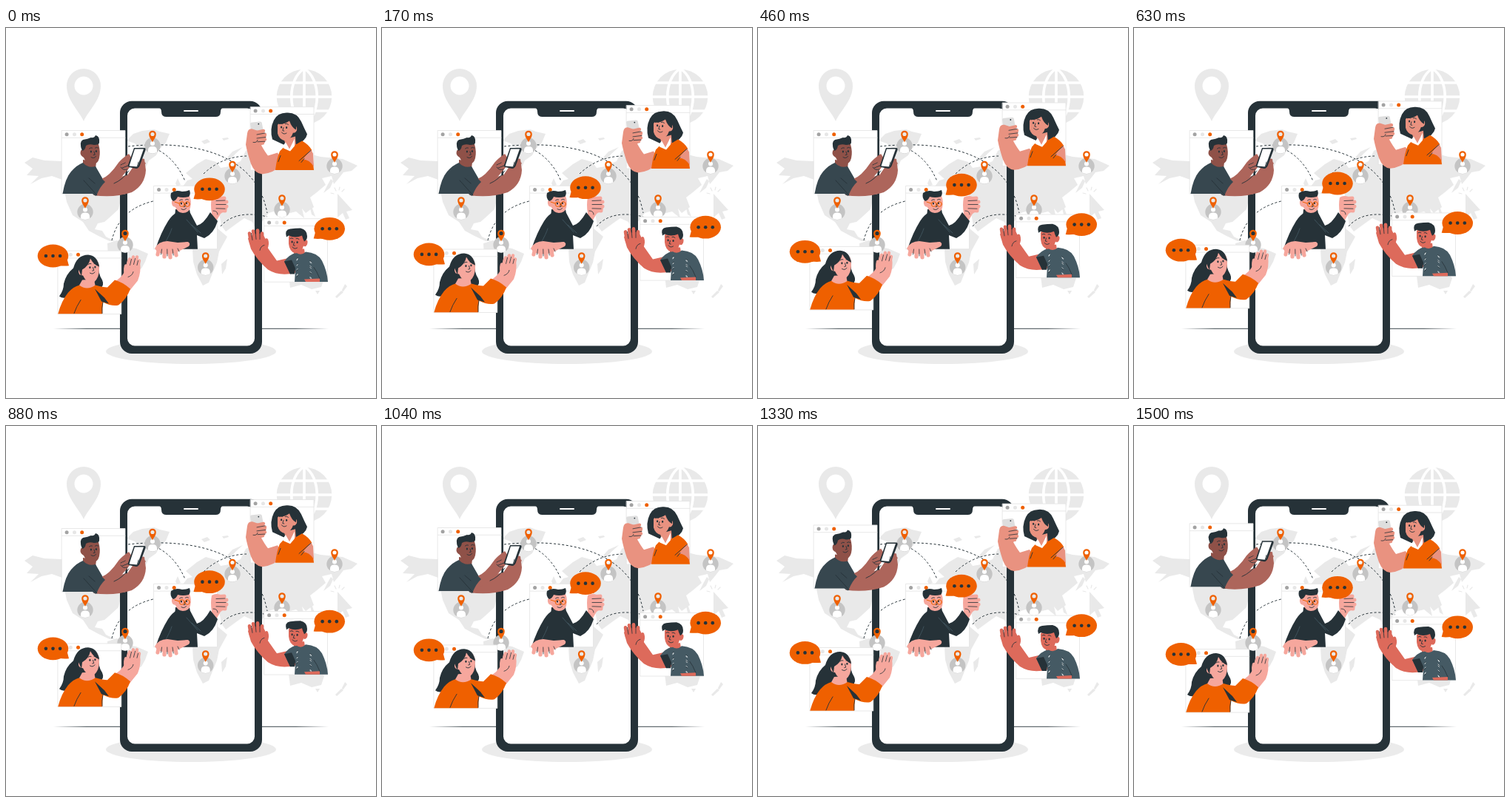
An HTML page with a canvas that plays this animation: 500x500 px, repeating every 1540 ms.

```html
<!DOCTYPE html>
<html lang="en">
<head>
<meta charset="utf-8">
<title>Connected people</title>
<style>
html, body { margin: 0; width: 100%; height: 100%; overflow: hidden; background: #fff; }
canvas { display: block; width: 100vw; height: 100vh; }
</style>
</head>
<body>
<canvas id="stage"></canvas>
<script>
const LOOP = 1540, HALF = LOOP / 2, LEAD = 40, RISE = 9.5;
const DARK = '#263238', SLATE = '#37474f', STEEL = '#455a64', ORANGE = '#ef6000';
const PALE = '#e9e9e9', GREY = '#c4c4c4', PINK = '#f6a79d';

const canvas = document.getElementById('stage');
const ctx = canvas.getContext('2d');
const density = Math.max(1, window.devicePixelRatio || 1);
canvas.width = canvas.height = 500 * density;

const paths = new Map();
function path(d) {
  if (!paths.has(d)) paths.set(d, new Path2D(d));
  return paths.get(d);
}
function shape(color, d) {
  ctx.fillStyle = color;
  ctx.fill(path(d), 'evenodd');
}
function line(d, width = 0.8, color = DARK, dash = []) {
  ctx.lineWidth = width;
  ctx.strokeStyle = color;
  ctx.lineCap = dash.length ? 'butt' : 'round';
  ctx.lineJoin = 'round';
  ctx.setLineDash(dash);
  ctx.stroke(path(d));
}
function oval(color, x, y, rx, ry = rx, turn = 0) {
  ctx.fillStyle = color;
  ctx.beginPath();
  ctx.ellipse(x, y, rx, ry, turn, 0, Math.PI * 2);
  ctx.fill();
}
function box(color, x, y, w, h, r) {
  ctx.fillStyle = color;
  ctx.beginPath();
  ctx.roundRect(x, y, w, h, r);
  ctx.fill();
}
function at(x, y, draw) {
  ctx.save();
  ctx.translate(x, y);
  draw();
  ctx.restore();
}

function panel(x, y) {
  box('#fff', x, y, 85.5, 85.5, 0);
  line(`M${x} ${y}h85.5v85.5h-85.5zM${x} ${y + 9.8}h85.5`, 0.8, '#e2e2e2');
  [['#a3a3a3', 6.6], ['#e6e6e6', 17], [ORANGE, 27.2]]
    .forEach(([color, dx]) => oval(color, x + dx, y + 5.2, 2.5));
}
function bubble(x, y, side) {
  oval(ORANGE, x, y, 20.8, 15.4);
  at(x, y, () => shape(ORANGE, `M${side * 19} 4L${side * 21.5} 13.3Q${side * 15} 14 ${side * 8} 13Z`));
  [-9.6, 0, 9.6].forEach(dx => oval(DARK, x + dx, y, 2.3));
}
function features(x, y, turn = 1) {
  at(x, y, () => {
    ctx.scale(turn, 1);
    oval(DARK, -3.6, 0, 1.1, 1.5);
    oval(DARK, 3.4, -0.6, 1.1, 1.5);
    line('M-6 -4q2 -2 4 -1M2 -5q2 -1.5 4 0M0.5 0l1.2 4.2-2 .4M-3.5 7.6q4 2.6 6.5 -1.2', 0.9);
  });
}

function marker(x, y) {
  at(x, y, () => {
    oval(GREY, 0, 13.5, 10.7);
    oval('#fff', 0, 10.5, 3);
    shape('#fff', 'M-6 22.3V19Q-5.5 14.6 0 14.6Q5.5 14.6 6 19V22.3Q0 25.5-6 22.3Z');
    shape(ORANGE, 'M0 9C-1.5 5-4.8 2.5-4.8-2A4.8 4.8 0 0 1 4.8-2C4.8 2.5 1.5 5 0 9ZM-2.6-2A2.6 2.6 0 0 0 2.6-2A2.6 2.6 0 0 0-2.6-2Z');
  });
}

function drawMap() {
  shape(PALE, 'M25 182L36 175 52 179 75 180 100 172 140 178 164 190 164 225 155 232 152 245 140 256 133 262 124 264 120 272 130 274 135 282 147 288 140 288 125 281 112 274 104 262 90 253 82 235 76 205 62 200 48 203 33 211 44 200 28 199 36 190Z');
  shape(PALE, 'M163 152L172 143 184 139 200 137 208 140 221 143 216 155 207 164 203 172 193 179 189 188 180 178 183 164 174 156Z');
  shape(PALE, 'M137 291L150 287 164 296 176 298 192 305 188 316 183 325 174 330 168 341 160 350 154 370 149 360 147 330 138 311Z');
  shape(PALE, 'M239 214L245 206 252 204 243 196 258 184 270 177 284 181 290 189 302 187 317 180 324 166 336 160 360 157 390 165 425 174 455 177 475 186 467 193 456 195 449 204 443 211 440 200 427 203 432 212 420 222 411 229 416 242 405 250 400 244 403 257 392 248 384 250 371 245 355 250 345 263 339 276 333 262 322 257 312 264 297 275 291 267 287 245 262 224Z');
  shape(PALE, 'M215 264L232 253 260 252 286 271 299 282 288 302 285 317 280 329 274 344 266 348 258 333 253 316 252 299 235 299 218 288ZM291 319L299 312 297 325 292 333Z');
  shape(PALE, 'M382 335L395 324 409 327 416 320 430 338 426 350 413 353 399 347 384 351ZM418 355l6 0-3 5ZM458 346l3 3-6 8-1-3ZM453 355l3 2-9 8-2-2Z');
  shape(PALE, 'M229 210l3-7 4 9-5 2ZM299 175l7-8 14-6-10 9-6 7ZM434 213l5-9 3 3-4 9-9 7ZM409 235l4 6 5 14-5-3ZM392 259l12 5 14 6-15 1-13-8ZM264 153l8-3 4 4-8 3ZM292 149l8-1 1 2-7 2Z');
}

function drawScene() {
  shape(PALE, 'M105 126C99 112 82 98 82 78A23 23 0 0 1 128 78C128 98 111 112 105 126ZM92.5 78A12.5 12.5 0 0 0 117.5 78A12.5 12.5 0 0 0 92.5 78Z');
  oval(PALE, 403, 93, 37.3);
  line('M403 55V131M366 93H440M371 74Q403 74 435 74M371 112H435M403 55C380 68 380 118 403 131M403 55C426 68 426 118 403 131', 3.6, '#fff');
  shape(PALE, 'M448 224L448 256 455 250 459 259 464 257 460 248 468 246Z');
  line('M446 220l-2-4M450 219l1-4M443 224l-4-1M454 221l3-3', 1.2, PALE);

  oval('#ebebeb', 250, 437, 115, 17);
  const fade = ctx.createLinearGradient(64, 0, 436, 0);
  [[0, 0], [0.12, 1], [0.88, 1], [1, 0]].forEach(([p, a]) => fade.addColorStop(p, `rgba(38,50,56,${a})`));
  line('M64 406.3H436', 0.9, fade);

  box('#fff', 158, 102, 184, 334, 14);
  drawMap();
  ctx.fillStyle = DARK;
  ctx.beginPath();
  ctx.roundRect(154, 98.7, 192, 341.3, 16);
  ctx.roundRect(164, 108.5, 172, 321, 10);
  ctx.fill('evenodd');
  shape(DARK, 'M205 107H295Q290 108 290 113Q290 120 284 120H216Q210 120 210 113Q210 108 205 107Z');
  line('M241 112H259', 2, '#fff');

  [
    'M165 160C230 153 336 158 353 250',
    'M202 163Q229 176 242 207',
    'M267 197Q291 174 325 173',
    'M143 287Q153 245 199 234',
    'M290 268Q310 245 353 255'
  ].forEach(d => line(d, 1, DARK, [3, 2.6]));
  [[198, 145.5], [306, 186.5], [444, 173], [107, 235], [373, 232], [161, 279.5], [269.7, 310]]
    .forEach(([x, y]) => marker(x, y));
}

function drawPhoneReader() {
  const skin = '#ad655b', face = '#8f5148';
  panel(75.5, 138.5);
  shape(skin, 'M118 226Q146 230 170 222Q188 212 189 192L187 177Q181 175 175 183L164 199 140 204Z');
  shape(face, 'M104 178L122 181 121 190Q113 195 104 188Z');
  shape(SLATE, 'M76.5 224Q80 203 88 194Q96 185 104 182Q111 190 121 187L132 206 122 224Z');
  shape(face, 'M103 157Q114 149 125 157Q128 167 126 176Q124 184 117 184Q108 183 105 175Q99 172 101 166Q102 164 104 165Z');
  shape(DARK, 'M103 166Q98 154 104 151Q111 150 115 148Q119 149 121 145Q127 146 126 155Q126 158 119 158Q112 156 108 159Q107 165 103 166Z');
  features(118.5, 167);
  shape(skin, 'M124 224L129 204Q140 200 152 182Q157 176 166 170L170 176Q171 184 165 191Q151 209 132 219Z');
  shape(SLATE, 'M108 205Q118 194 130 204L134 208Q127 214 122 227Q116 225 113 219Z');
  line('M105 206L123 226M112 203l8 7M146 210q12-5 20-17M155 185l9-4M157 189l8-3', 0.9);
  shape(DARK, 'M173 162H187Q189 162 188.500 165L180 188Q179 190 176 190L166 188Q164 187 165 185Z');
  shape('#fff', 'M174 163.500H186L177.500 187.500L166.500 186.500Z');
  line('M158 186Q166 184 164 176M187 183l-8 8', 3.4, skin);
  line('M164 191Q158 193 155 188M179 181l-2 7', 0.8);
}

function drawSelfieTaker() {
  const skin = '#e99280';
  panel(330.5, 107.2);
  shape('#dedede', 'M330 130Q330 128 333 128L343 127Q346 127 346 130L350 151 334 155Z');
  oval(DARK, 341.3, 130.2, 0.9);
  shape(skin, 'M326 143Q327 136 333 137L342 140 352 143 350 155 345 159Q350 168 354 173L367 169 375 184Q361 197 346 198Q336 197 331 184Q326 169 324 158Z');
  line('M337 142L348 139.500M339 147L350 145M340 152L350 151M340 156L347 156', 4.4, skin);
  line('M339 144.500l11-2M339 149.500l12-1.500M340 154.300l10-.6M334 155q5 1 6-3', 0.8);
  shape(DARK, 'M360 151Q356 137 362 125Q367 115 379 115Q393 114 399 127Q403 136 407 144Q405 154 390 159L375 158Z');
  shape(skin, 'M376 151L391 147 392 162 380 170Z');
  shape(ORANGE, 'M364 192.500Q366 176 370 167Q374 162 378 160L382 166 390 159 400 153Q409 158 413 165L416 192.500Z');
  shape(skin, 'M412 165L401 178Q410 178 416 188L415 170Z');
  shape('#fff', 'M375 163Q375 157 378 155L383 164 390 150 390 160 384 167Z');
  shape(skin, 'M367 131Q369 124 380 125Q387 124 389 133Q394 132 393 139Q391 143 388 142Q385 151 377 153Q369 151 367 143Z');
  shape(DARK, 'M363 139Q364 121 379 119Q394 122 392 138Q386 135 383 126Q376 131 368 130Q365 134 363 139Z');
  features(375.5, 135, -1);
  line('M396 180L412 166M399 182l4-5M368 181l3-8', 0.9);
}

function drawWaver() {
  const skin = '#dd6a5b';
  panel(349, 258.2);
  shape(skin, 'M327 285Q330 279 346 278Q353 287 354 298L366 315 388 310 392 331Q370 337 354 327Q339 314 331 299Z');
  line('M331 290L329 278M336 287L334 275M341 287L340 274M346 289L346 278M351 298Q354 293 352 287', 4.6, skin);
  line('M333 287l-1.500-9M338 286l-1-10M343 286l0-9M343 301q1-6 6-7', 0.8);
  shape(skin, 'M389 299L403 299 404 306Q396 312 389 305Z');
  shape(STEEL, 'M376 316Q382 307 392 304Q399 309 405 303Q421 304 427 315Q434 329 435 343.500H390L391 328 384 333Z');
  shape(DARK, 'M376 316L386 314 391 325 390 333 384 333Z');
  for (let i = 0; i < 20; i++) {
    const x = 394 + (i * 17) % 34, y = 311 + (i * 11) % 29;
    if (x < 412 + (y - 305) * 0.6) line(`M${x} ${y}l${i % 2 ? 1.5 : -1} 1.5`, 1, i % 3 ? '#dce3e6' : DARK);
  }
  shape(skin, 'M403 340L424 339V343.500H405Z');
  line('M424 339Q420 329 416 324', 0.8);
  shape(skin, 'M382 282Q392 276 403 281L404 287Q409 286 407 293Q405 297 402 295Q400 304 391 305Q383 303 382 292Z');
  shape(DARK, 'M379 283Q376 273 384 272Q391 271 398 271Q407 273 407 282Q407 287 403 289Q401 285 400 281Q391 285 382 281Z');
  features(390, 290, -1);
}

function drawGreeter() {
  panel(70.300, 301.600);
  shape(DARK, 'M72 363Q78 355 78 346Q81 333 91 325Q96 307 111 307Q123 308 126 322Q124 332 130 341Q133 348 128 352L104 356 84 364Q77 367 72 363Z');
  shape(PINK, 'M103 341L119 340 121 351Q110 360 98 350Z');
  shape(PINK, 'M145 344Q156 339 161 328L164 314 181 317Q183 330 178 342L165 358Z');
  line('M164 325L167 313M169 321L172 310M174 321L177 310M178 323L180 315M163 334Q160 330 162 322', 4.400, PINK);
  line('M167.500 321l2-8M172.500 320l2-8M177 321l1.500-6M165 337q6-2 7-7', 0.8);
  shape(ORANGE, 'M70.300 386.800Q75 369 84 358Q91 350 99 348Q109 356 121 348Q131 351 137 351L147 341Q158 344 168 353Q163 367 152 375Q143 377 131 371L130 386.800Z');
  shape(DARK, 'M120 353L133 365 139 373 129 370Z');
  line('M92 386Q95 377 101 368M131 371Q129 379 130 386', 0.9);
  shape(PINK, 'M100 320Q105 310 117 311Q126 313 126 326Q126 338 119 344Q109 346 104 335Q97 335 98 327Q99 323 101 324Z');
  shape(DARK, 'M98 327Q95 312 110 308Q123 308 126 323Q119 321 114 312Q112 322 103 327L102 336Z');
  features(117, 324);
}

function drawHolder() {
  panel(200, 213.300);
  shape(PINK, 'M278 250Q276 239 278 229Q285 224 296 231L299 245 290 251 284 261 277 258Z');
  line('M282 231L295 230M283 236L298 235M284 241L298 241M284 246L296 247M281 259L284 251', 5, PINK);
  line('M284 233.500l12-.5M284 238.500l13 0M284 243.800l12 .4M280 247q6 0 6 5', 0.8);
  shape(DARK, 'M202 298.800Q209 277 219 261Q224 253 231 249Q240 254 249 250L258 267Q267 265 276 249L286 261Q281 278 268 284L258 280 259 298.800Z');
  shape(DARK, 'M229 245H248L250 256H228Z');
  line('M244 259L259 276M214 292Q222 278 224 271M251 266l12 11', 0.8, STEEL);
  shape(PINK, 'M227 228Q237 221 248 227Q251 234 249 243Q247 250 239 250Q231 249 229 242Q223 241 224 234Q225 232 228 233Z');
  shape(DARK, 'M226 234Q221 230 223 223Q229 218 238 221Q244 221 248 219Q250 225 247 228Q239 230 232 228Q230 233 226 234Z');
  features(240.500, 237);
  line('M241 238a3.400 3.400 0 1 1-6.800 0a3.400 3.400 0 1 1 6.800 0M248.200 238a3 3.400 0 1 1-6 0a3 3.400 0 1 1 6 0M234 237l-6-2', 1, ORANGE);
  shape(PINK, 'M201 298Q206 288 218 288L232 290 246 289Q250 291 247 295L235 301Q220 309 205 303Z');
  line('M207 297L205 306M214 297L214 309M221 298L222 310M228 297L230 307M234 295L244 292', 5.200, PINK);
  line('M210.500 299l-1 7M217.800 299l.2 9M225 299l1.200 8M232 298l2 4', 0.8);
}

function draw(t) {
  const beat = ((t + LEAD) % LOOP) / HALF;
  const lift = RISE * (1 - Math.abs(1 - beat));
  const lateLift = Math.max(0, t + LEAD - 1000) * RISE / HALF;

  ctx.setTransform(density, 0, 0, density, 0, 0);
  ctx.fillStyle = '#fff';
  ctx.fillRect(0, 0, 500, 500);
  drawScene();
  at(0, -lateLift, drawPhoneReader);
  drawHolder();
  at(0, -lift, () => {
    drawSelfieTaker();
    drawWaver();
    drawGreeter();
    bubble(437.200, 271.800, -1);
    bubble(63.500, 308.500, 1);
    bubble(275, 218.300, -1);
  });
}

const start = performance.now();
function tick() {
  draw((performance.now() - start) % LOOP);
  requestAnimationFrame(tick);
}
tick();
</script>
</body>
</html>
```
